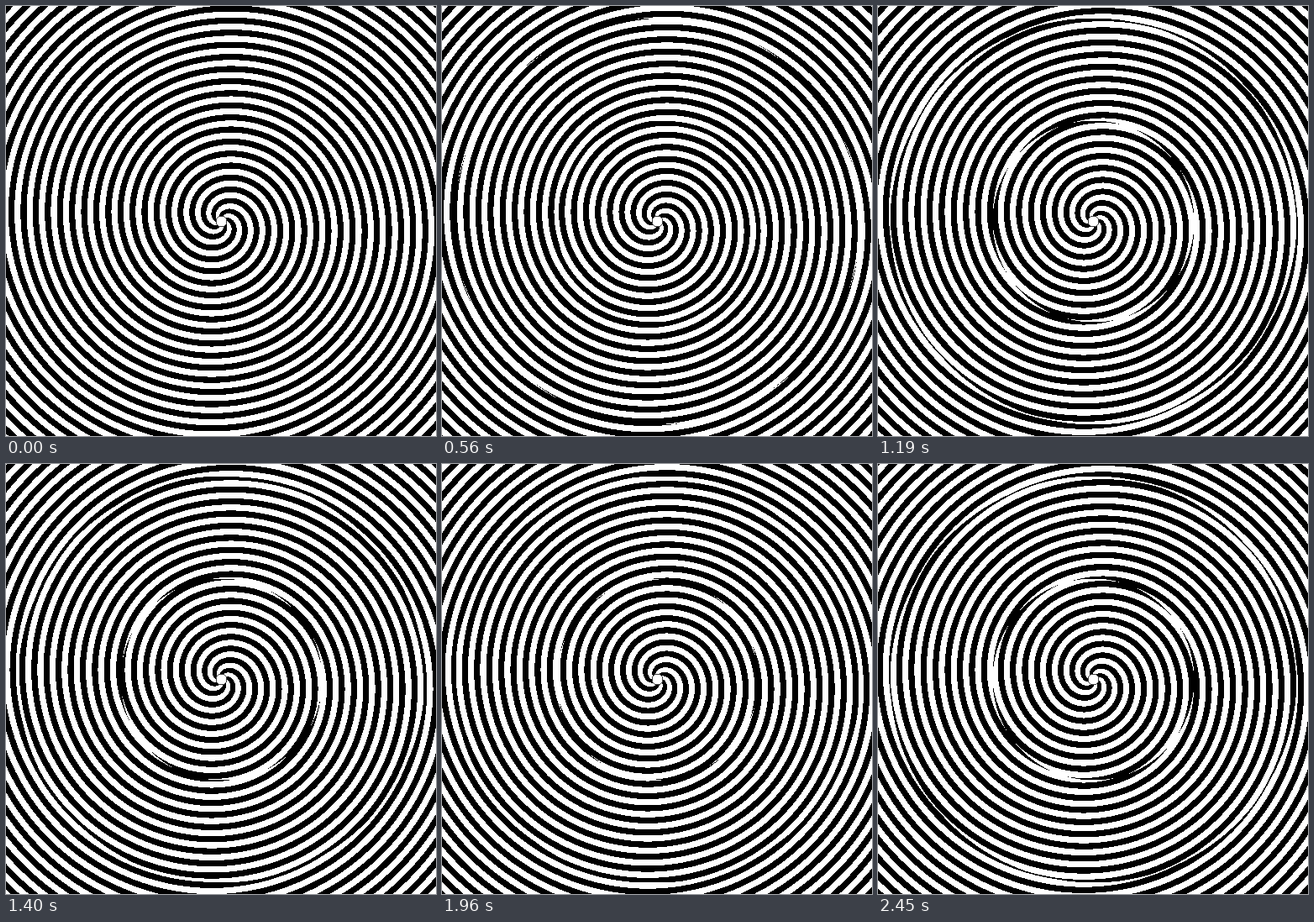
Animation of 512 by 512 pixels, one loop 2520 ms. Source, as an HTML page with a canvas:

```html
<!DOCTYPE html>
<html lang="en">
<head>
<meta charset="utf-8">
<title>Counter-rotating spiral</title>
<style>
  html, body { margin: 0; height: 100%; overflow: hidden; background: #fff; }
  canvas { display: block; }
</style>
</head>
<body>
<canvas id="stage" width="512" height="512"></canvas>
<script>
const SIZE = 512, CENTER = 256;
const ARMS = 5;
const GROWTH = 11.5;          // radius gained per radian
const INSET = 0.45;           // radius at which the arms begin
const STEP_MS = 70, STEPS = 36;
const TURN = 22 / 360 * ARMS; // stripes passed per step
const HUB = 6, HUB_RIM = 7;
const INNER = 120, OUTER = 242;
const WHITE = 0xffffffff, BLACK = 0xff000000, RIM = 0xff404040;

const ctx = document.getElementById('stage').getContext('2d');
const image = ctx.createImageData(SIZE, SIZE);
const pixels = new Uint32Array(image.data.buffer);

// Stripe position and ring direction of every pixel; the hub stays still.
const phase = new Float32Array(SIZE * SIZE);
const direction = new Int8Array(SIZE * SIZE);
for (let i = 0; i < phase.length; i++) {
  const x = i % SIZE - CENTER, y = Math.floor(i / SIZE) - CENTER;
  const r = Math.hypot(x, y);
  phase[i] = (Math.atan2(y, x) - (r - INSET) / GROWTH) * ARMS / (2 * Math.PI);
  if (r < HUB_RIM) pixels[i] = r < HUB ? WHITE : RIM;
  else direction[i] = r >= INNER && r < OUTER ? -1 : 1;
}

function draw(step) {
  for (let i = 0; i < phase.length; i++) {
    if (!direction[i]) continue;
    const p = phase[i] - direction[i] * step * TURN;
    pixels[i] = p - Math.floor(p) < 0.5 ? BLACK : WHITE;
  }
  ctx.putImageData(image, 0, 0);
}

let shown = -1;
function tick() {
  const step = Math.floor(performance.now() / STEP_MS) % STEPS;
  if (step !== shown) draw(shown = step);
  requestAnimationFrame(tick);
}
tick();
</script>
</body>
</html>
```
